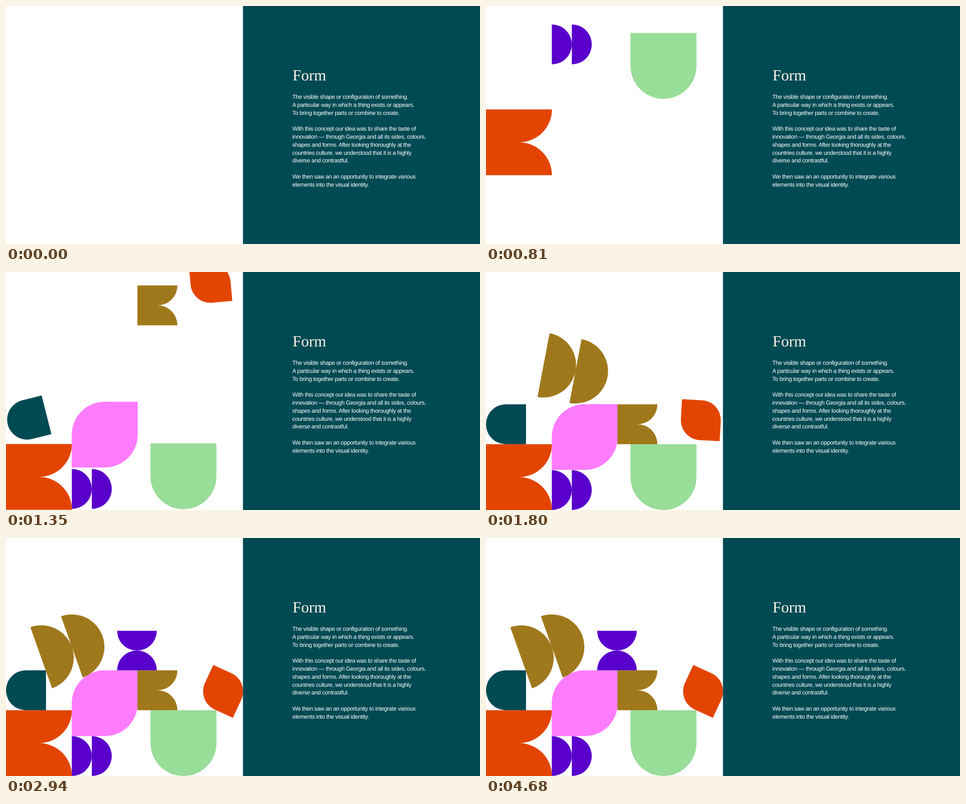
Animation, 1055 px wide and 531 px high, one loop 8400 ms. Source, as an HTML page with a canvas:

```html
<!DOCTYPE html>
<html lang="en">
<head>
<meta charset="utf-8">
<title>Form</title>
<style>
  html, body { margin: 0; width: 100%; height: 100%; overflow: hidden; background: #fff; }
  canvas, svg { position: absolute; left: 0; top: 0; width: 1055px; height: 531px; display: block; }
  text { text-rendering: geometricPrecision; }
  .title { font: 34.5px "Liberation Serif", "Times New Roman", serif; fill: #fbf6ec; }
  .body { font: 13px "Liberation Sans", Arial, sans-serif; letter-spacing: -.38px; fill: #fff; }
</style>
</head>
<body>
<canvas id="stage" width="1055" height="531"></canvas>
<svg viewBox="0 0 1055 531">
  <rect x="527.4" width="528" height="531" fill="#004a53"/>
  <text class="title" x="637.8" y="166">Form</text>
  <g class="body" id="copy"></g>
</svg>
<script>
const LOOP = 8400, STEP = 30;
const GRAVITY = 4200;               // px per second squared
const SINK = 6, SETTLE = 0.5;       // px and seconds of slow settling
const FLOOR = 531, BIG = 73.4, SMALL = 44.5;
const SHELF = FLOOR - 2 * BIG;      // top of the large pieces
const STEP_TOP = FLOOR - 2 * SMALL; // top of the small pieces on the floor
const LEDGE = SHELF - 2 * SMALL;    // top of the second layer

const copy = `The visible shape or configuration of something.
A particular way in which a thing exists or appears.
To bring together parts or combine to create.

With this concept our idea was to share the taste of
innovation — through Georgia and all its sides, colours,
shapes and forms. After looking thoroughly at the
countries culture, we understood that it is a highly
diverse and contrastful.

We then saw an an opportunity to integrate various
elements into the visual identity.`;
copy.split('\n').forEach((line, i) => {
  const text = document.createElementNS('http://www.w3.org/2000/svg', 'text');
  text.setAttribute('x', 637.3);
  text.setAttribute('y', 207.4 + i * 17.75);
  text.textContent = line;
  document.getElementById('copy').append(text);
});

const ctx = document.getElementById('stage').getContext('2d');
const Q = Math.PI / 2;

// Outlines live in a box from -1 to 1.
const tile = (...radii) => () => ctx.roundRect(-1, -1, 2, 2, radii);

function notch() {
  ctx.moveTo(-1, -1);
  ctx.lineTo(1, -1);
  ctx.arc(0, -1, 1, 0, Q);
  ctx.arc(0, 1, 1, -Q, 0);
  ctx.lineTo(-1, 1);
  ctx.closePath();
}

function halfDisc(x, y, from) {
  ctx.moveTo(x + Math.cos(from), y + Math.sin(from));
  ctx.arc(x, y, 1, from, from + 2 * Q);
  ctx.closePath();
}

function pair() {
  halfDisc(-1, 0, -Q);
  halfDisc(0, 0, -Q);
}

function hourglass() {
  halfDisc(0, -1, 0);
  halfDisc(0, 1, 2 * Q);
}

const linear = p => p;
const easeIn = p => p * p;
const easeOut = p => 1 - (1 - p) ** 2;
const smooth = p => p * p * (3 - 2 * p);

const glide = (from, to, start, end, ease) => t => {
  const p = Math.min(1, Math.max(0, (t - start) / (end - start)));
  return from + (to - from) * ease(p);
};
const at = (value, t) => typeof value === 'function' ? value(t) : value;

const ORANGE = '#e34500', PURPLE = '#5a00cc', GREEN = '#98dd98';
const PINK = '#ff7cff', TEAL = '#004a53', GOLD = '#a0781c';

// x and y: resting centre; start: release in ms; bounce: rebound speed
const shapes = [
  { draw: notch, color: ORANGE, half: BIG, x: BIG, y: FLOOR - BIG, start: 386, bounce: 512 },
  { draw: tile(0, 0, 1, 1), color: GREEN, half: BIG, x: 395, y: FLOOR - BIG, start: 496, bounce: 350 },
  { draw: pair, color: PURPLE, half: SMALL, x: 191, y: FLOOR - SMALL, start: 561, bounce: 217 },
  { draw: tile(1, 0, 0, 1), color: TEAL, half: SMALL, y: SHELF - SMALL, start: 865, bounce: 300,
    x: glide(76.5, SMALL, 865, 1392, linear),
    turn: glide(-26.5, 0, 865, 1575, easeIn) },
  { draw: tile(1, 0, 1, 0), color: PINK, half: BIG, x: 219.8, y: STEP_TOP - BIG, start: 874, bounce: 300 },
  { draw: notch, color: GOLD, half: SMALL, x: 337, y: SHELF - SMALL, start: 1112, bounce: 200 },
  { draw: tile(0, 1, 0, 1), color: ORANGE, half: SMALL, start: 1169, bounce: 465,
    x: glide(446, 483.2, 1169, 1899, linear),
    y: glide(338, 342.2, 1800, 2700, smooth),
    turn: glide(-6.5, 24.7, 1169, 2860, smooth) },
  { draw: pair, color: GOLD, half: 72.4, start: 1426, bounce: 0,
    x: glide(199.2, 146.5, 1800, 3000, easeOut),
    y: glide(221, 243, 1800, 3000, easeOut),
    turn: glide(10.7, -19.6, 1800, 3000, easeOut) },
  { draw: hourglass, color: PURPLE, half: 44.1, x: 291.5, y: LEDGE - 44.1, start: 1797, bounce: 150 }
];

function height(s, t) {
  const rest = at(s.y, t);
  const drop = Math.sqrt(2 * (at(s.y, 0) + s.half) / GRAVITY);
  const fall = (t - s.start) / 1000;
  const since = fall - drop;
  // Only the lower pieces, released first, settle softly.
  const soft = s.start < 1000 ? SINK : 0;
  const sink = soft * Math.max(0, 1 - Math.max(0, since) / SETTLE);
  if (since < 0) return Math.min(rest - sink, GRAVITY / 2 * fall * fall - s.half);
  return rest - Math.max(sink, s.bounce * since - GRAVITY / 2 * since * since);
}

function frame(now) {
  const t = Math.floor((now % LOOP) / STEP) * STEP;
  ctx.fillStyle = '#fff';
  ctx.fillRect(0, 0, 1055, 531);
  for (const s of shapes) {
    if (t < s.start) continue;
    ctx.save();
    ctx.translate(at(s.x, t), height(s, t));
    ctx.rotate(at(s.turn ?? 0, t) * Math.PI / 180);
    ctx.scale(s.half, s.half);
    ctx.beginPath();
    s.draw();
    ctx.fillStyle = s.color;
    ctx.fill();
    ctx.restore();
  }
}

let origin;
function tick(now) {
  origin ??= now;
  frame(now - origin);
  requestAnimationFrame(tick);
}
frame(0);
requestAnimationFrame(tick);
</script>
</body>
</html>
```
